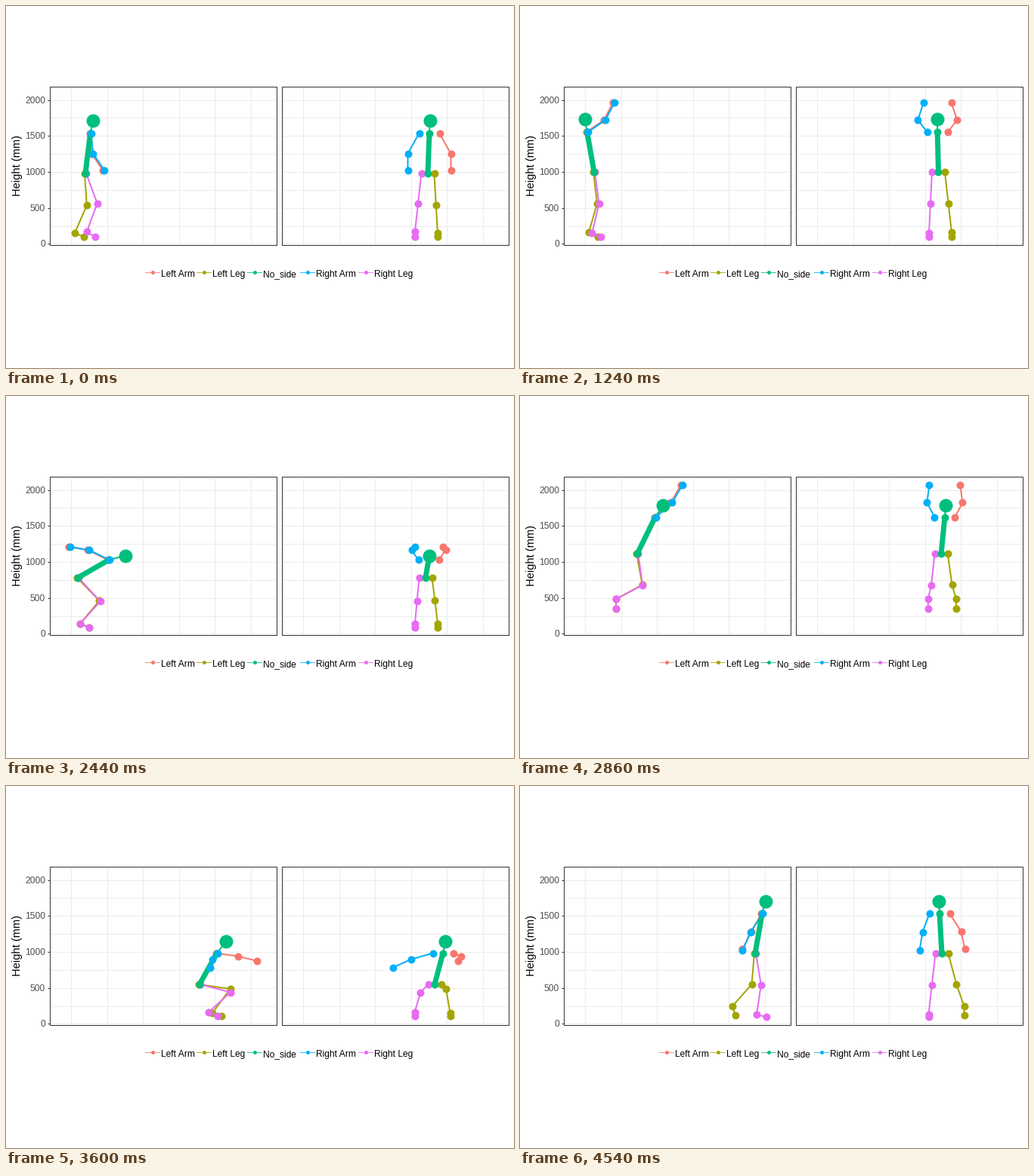
Write a matplotlib script that moves like this. It is 672 by 480 pixels and loops after 4.56 s.

```python
import numpy as np
import matplotlib.pyplot as plt
from matplotlib.animation import FuncAnimation
from matplotlib.patches import Rectangle

W, H, DPI = 672, 480, 96
FRAMES, STEP = 228, 20
PX = 72 / DPI  # points per pixel

COLORS = dict(la="#F8766D", ll="#A3A500", t="#00BF7D", ra="#00B0F6", rl="#E76BF3")
LABELS = dict(la="Left Arm", ll="Left Leg", t="No_side", ra="Right Arm", rl="Right Leg")
LEGEND_X = dict(la=194, ll=262, t=329, ra=399, rl=476)

# body measures in pixels
UPPER_ARM, FOREARM, THIGH, SHANK, FOOT = 31, 26.5, 42.5, 40, 13
SHOULDER_HALF, HIP_HALF = 13.5, 8.5

plt.rcParams["font.family"] = "Liberation Sans"


# ---------------------------------------------------------------- motion
def curve(*keys):
    """Smooth path through (time, values...) keys that never overshoots them."""
    keys = np.array(keys, float)
    times, values = keys[:, 0], keys[:, 1:]
    gaps = np.diff(times)
    slopes = np.diff(values, axis=0) / gaps[:, None]
    a, b = slopes[:-1], slopes[1:]
    same = a * b > 0
    tangents = np.zeros_like(values)
    tangents[1:-1] = np.where(same, 2 * a * b / np.where(same, a + b, 1), 0)
    tangents[0], tangents[-1] = slopes[0], slopes[-1]

    def at(time):
        i = int(np.clip(np.searchsorted(times, time, "right") - 1, 0, len(gaps) - 1))
        gap = gaps[i]
        u = (time - times[i]) / gap
        ease = u * u * (3 - 2 * u)
        return (values[i] * (1 - ease) + values[i + 1] * ease
                + gap * u * (1 - u) * ((1 - u) * tangents[i] - u * tangents[i + 1]))

    return at


# hip x, hip y, forward lean in degrees
body_path = curve((0, 105, 222, 7), (700, 98, 220, -5), (1540, 98, 220, -11),
                  (1800, 101, 220, -2), (2160, 95, 231, 30), (2440, 95, 241, 60),
                  (2700, 121, 226, 43), (2960, 178, 203, 17), (3240, 225, 222, 5),
                  (3600, 256, 263, 29), (4050, 290, 226, 30), (4540, 311, 222, 10))

# hip and neck x as seen from the front
sway_path = curve((0, 558, 560), (700, 552, 550), (1800, 555, 556), (2440, 555, 559),
                  (3240, 561, 566), (3600, 567, 578), (4540, 558, 555))

# upper arm and forearm angles: 0 hangs down, 90 points forward
swing = [(0, 6, 34), (700, 102, 126), (1540, 129, 158), (1800, 124, 130),
         (2160, 23, 53), (2360, -78, -88), (2440, -116, -100), (2700, 8, 56),
         (2860, 132, 150)]
swing_path = {
    1: curve(*swing, (3240, 88, 88), (3600, 82, 76), (4200, 12, 5), (4540, -29, -27)),
    -1: curve(*swing, (3240, 81, 82), (3600, -40, -17), (4540, -34, -23))}

# sideways reach of the upper arm and the forearm
reach = [(0, 15, 0), (700, 14, -8), (2440, 9, -4), (2860, 10, -3), (3240, 20, 12)]
reach_path = {
    1: curve(*reach, (3600, 10, -4), (4200, 20, 12), (4540, 15, 5)),
    -1: curve(*reach, (3600, 29, 24), (4540, 9, 4))}

# ankle x, ankle y, downward pitch of the foot
jump = [(2440, 98, 302, 21), (2700, 106, 291, 62), (2880, 131, 268, 90),
        (3040, 199, 264, 60)]
foot_path = {
    1: curve((0, 91, 301, 23), (1800, 91, 300, 25), *jump, (3240, 262, 291, 18),
             (3320, 273, 301, 20), (4050, 273, 301, 20), (4540, 281, 292, 72)),
    -1: curve((0, 107, 299, 35), (400, 95, 301, 25), (1800, 96, 301, 23), *jump,
              (3240, 252, 296, 9), (3320, 268, 300, 25), (4000, 268, 300, 25),
              (4180, 284, 287, 55), (4380, 313, 303, 14), (4540, 313, 303, 14))}


# ---------------------------------------------------------------- skeleton
# every joint is (side x, front x, y)
def segment(length, angle, out=0):
    a = np.radians(angle)
    flat = np.sqrt(length ** 2 - out ** 2)
    return np.array([flat * np.sin(a), out, flat * np.cos(a)])


def arm(time, neck, side):
    upper, fore = swing_path[side](time)
    elbow_out, hand_out = side * reach_path[side](time)
    shoulder = neck + [-side, side * SHOULDER_HALF, 0]
    elbow = shoulder + segment(UPPER_ARM, upper, elbow_out)
    return np.array([shoulder, elbow, elbow + segment(FOREARM, fore, hand_out)])


def leg(time, pelvis, side):
    x, y, pitch = foot_path[side](time)
    middle = np.interp(time, [2700, 3240], [556, 564])
    spread = np.interp(time, [2700, 3240, 3320], [15, 27, 23.5])
    hip = pelvis + [-side, side * HIP_HALF, 0]
    ankle = np.array([x, middle + side * spread, y])
    toe = ankle + segment(FOOT, 90 - pitch)

    # the knee bends forward in the side plane
    dist = np.linalg.norm(ankle - hip)
    along = (ankle - hip) / dist
    forward = np.array([along[2], 0, -along[0]]) / np.hypot(along[0], along[2])
    if dist < THIGH + SHANK:
        down = (THIGH ** 2 - SHANK ** 2 + dist ** 2) / (2 * dist)
    else:
        down = dist * THIGH / (THIGH + SHANK)
    bend = np.sqrt(max(0, THIGH ** 2 - down ** 2))
    knee = hip + down * along + bend * forward
    return np.array([hip, knee, ankle, toe])


def skeleton(time):
    x, y, lean = body_path(time)
    hip_front, neck_front = sway_path(time)
    sway = neck_front - hip_front
    pelvis = np.array([x, hip_front, y])
    spine = np.interp(y, [222, 241], [53.5, 47.3])
    neck = pelvis + segment(spine, 180 - lean)
    neck[1] = neck_front
    head = neck + segment(16.3 + 0.1 * abs(lean), 177 - 1.2 * lean)
    head[1] += 0.3 * sway
    return dict(t=np.array([head, neck, pelvis]),
                la=arm(time, neck, 1), ra=arm(time, neck, -1),
                ll=leg(time, pelvis, 1), rl=leg(time, pelvis, -1))


# ---------------------------------------------------------------- stage
fig = plt.figure(figsize=(W / DPI, H / DPI), dpi=DPI, facecolor="white")
ax = fig.add_axes([0, 0, 1, 1])
ax.set_xlim(0, W)
ax.set_ylim(H, 0)
ax.axis("off")


def rule(x0, y0, x1, y1, color):
    ax.plot([x0, x1], [y0, y1], color=color, lw=PX, solid_capstyle="butt", zorder=1)


def height_y(mm):
    return round(315.4 - mm * 0.0954)


def draw_panel(left):
    right, top, bottom = left + 300, 107, 317
    for mm in range(0, 2001, 250):
        rule(left, height_y(mm), right, height_y(mm), "#EBEBEB")
    for i in range(6):
        x = round(left + 28 + 47.6 * i)
        rule(x, top, x, bottom, "#EBEBEB")
    ax.add_patch(Rectangle((left, top), right - left, bottom - top, fill=False,
                           ec="#333333", lw=PX, zorder=9))


draw_panel(58)
draw_panel(365)

for mm in range(0, 2001, 500):
    y = height_y(mm)
    rule(55, y, 58, y, "#333333")
    ax.text(52, y + 4.4, str(mm), size=12 * PX, color="#4D4D4D", ha="right", va="baseline")
ax.text(15, 211, "Height (mm)", size=14.67 * PX, rotation=90, ha="center", va="center")

for part, x in LEGEND_X.items():
    ax.plot([x - 10, x + 9], [353, 353], color=COLORS[part], lw=PX, alpha=0.8)
    ax.plot(x, 353, "o", color=COLORS[part], ms=5 * PX, mew=0)
    ax.text(x + 11, 359, LABELS[part], size=12 * PX, va="baseline")


# ---------------------------------------------------------------- figures
def stroke(part, width, z):
    return ax.plot([], [], color=COLORS[part], lw=width * PX, zorder=z,
                   solid_capstyle="butt", solid_joinstyle="round")[0]


def dots(part, size, z):
    return ax.plot([], [], "o", color=COLORS[part], ms=size * PX, mew=0, zorder=z)[0]


def make_figure():
    """Artists of each part, paired with the joints they show."""
    every = slice(None)
    parts = {}
    for z, part in enumerate(("la", "ll", "rl")):
        parts[part] = [(stroke(part, 2, 3 + z), every), (dots(part, 10, 3.5 + z), every)]
    parts["ra"] = [(stroke("ra", 2, 6), every), (dots("ra", 10, 7.5), every)]
    parts["t"] = [(stroke("t", 2, 6.5), slice(0, 2)), (stroke("t", 7, 6.6), slice(1, 3)),
                  (dots("t", 10, 7), slice(1, 3)), (dots("t", 18, 8), slice(0, 1))]
    return parts


views = [make_figure(), make_figure()]


def draw(frame):
    changed = []
    for part, joints in skeleton(frame * STEP).items():
        for column, view in enumerate(views):
            for artist, span in view[part]:
                artist.set_data(joints[span, column], joints[span, 2])
                changed.append(artist)
    return changed


anim = FuncAnimation(fig, draw, frames=FRAMES, interval=STEP, repeat=True,
                     repeat_delay=0, blit=False)
plt.show()
```
